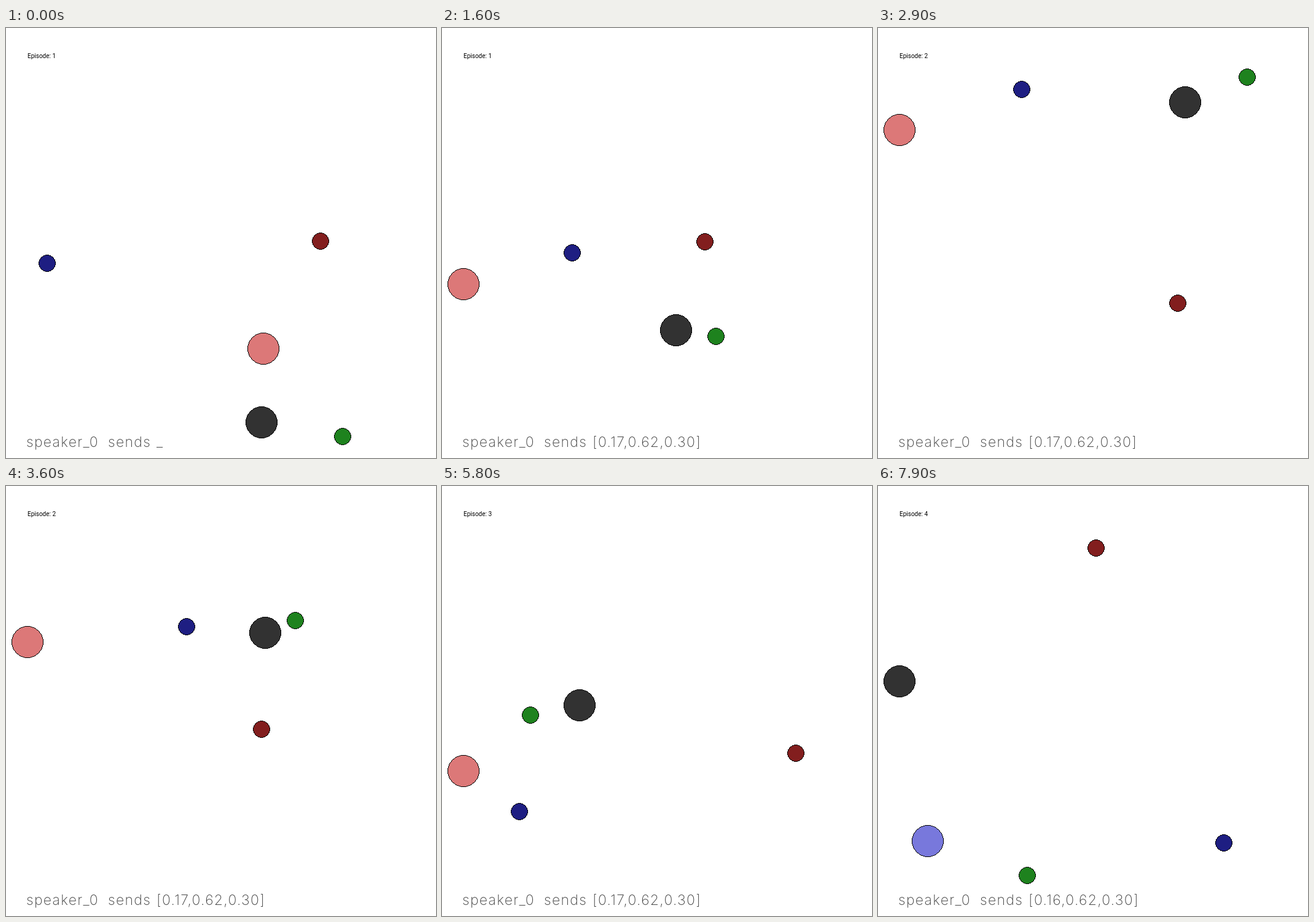
An HTML page with a canvas for the animation above (8000 ms loop, 700x700 px).

```html
<!DOCTYPE html>
<html lang="en">
<head>
<meta charset="utf-8">
<title>Speaker and listener</title>
<style>
  html, body { margin: 0; width: 100%; height: 100%; overflow: hidden; background: #fff; }
  canvas { display: block; }
</style>
</head>
<body>
<canvas id="stage" width="700" height="700"></canvas>
<script>
const ctx = document.getElementById('stage').getContext('2d');
const STEP = 100, STEPS = 80, EPISODE = 25, HALF = 350;
const MARK_COLORS = ['rgb(130,30,30)', 'rgb(30,130,30)', 'rgb(30,30,130)'];
const PINK = 'rgb(220,120,120)', LILAC = 'rgb(120,120,220)';

// World positions; pull is the listener's terminal speed per step.
const episodes = [
  { start: [77.8, 192.3], pull: [-66.33, -3.1], speaker: [74.08, 325.6],
    marks: [[180.5, -2.5], [221, 350], [-313.5, 37.5]], color: PINK, message: '[0.17,0.62,0.30]' },
  { start: [-315.2, -234.2], pull: [-74.18, -2.94], speaker: [195.8, -296.3],
    marks: [[180.7, 128.15], [327.2, -350], [-149, -323.2]], color: PINK, message: '[0.17,0.62,0.30]' },
  { start: [-141.1, 188.2], pull: [-78.15, -2.6], speaker: [-192.8, 11.6],
    marks: [[350, 132.3], [-315.6, 36.6], [-343.4, 279.5]], color: PINK, message: '[0.17,0.62,0.30]' },
  { start: [-206.4, 258.2], pull: [-72, -2.9], speaker: [-350, -34.5],
    marks: [[6.5, -275.5], [-117.5, 316.5], [237.5, 257.5]], color: LILAC, message: '[0.16,0.62,0.30]' }
];

// Distance covered after n steps of constant force with 25% damping.
const travel = n => n - 3 * (1 - 0.75 ** n);

// Rim points of one quadrant by the midpoint circle method.
function rim(r) {
  const points = [];
  for (let x = 0, y = r, f = 1 - r; x < y;) {
    if (f >= 0) f -= 2 * --y;
    f += 2 * ++x + 1;
    points.push([x, y], [y, x]);
  }
  return points;
}
const rims = { 14: rim(14), 26: rim(26) };

// Unsmoothed disc with a black outline one pixel wide.
function disc(cx, cy, r, color) {
  ctx.fillStyle = color;
  for (const [x, y] of rims[r])
    for (const row of [cy + y - 1, cy - y]) ctx.fillRect(cx - x, row, 2 * x, 1);
  ctx.fillStyle = '#000';
  for (const [x, y] of rims[r])
    for (const row of [cy + y - 1, cy - y])
      for (const col of [cx + x - 1, cx - x]) ctx.fillRect(col, row, 1, 1);
}

function entity(pos, zoom, r, color) {
  const [x, y] = pos.map(v => Math.floor(HALF + 0.9 * Math.floor(v * zoom + 1e-6) + 1e-6));
  disc(x, y, r, color);
}

function text(str, x, y, font, color, spacing = '0px') {
  ctx.font = font;
  ctx.letterSpacing = spacing;
  ctx.fillStyle = color;
  ctx.fillText(str, x, y);
}

const say = (str, x) => text(str, x, 682, '200 23px Inter, sans-serif', '#444', '1.3px');

function draw(step) {
  const index = Math.floor(step / EPISODE), local = step % EPISODE;
  const ep = episodes[index];
  const moved = travel(Math.max(0, local - 1));
  const listener = ep.start.map((v, i) => v + ep.pull[i] * moved);
  // The view widens to keep everything on stage.
  const reach = Math.max(...[listener, ep.speaker, ...ep.marks].flat().map(Math.abs));
  const zoom = HALF / reach;

  ctx.fillStyle = '#fff';
  ctx.fillRect(0, 0, 700, 700);
  entity(ep.speaker, zoom, 26, 'rgb(50,50,50)');
  entity(listener, zoom, 26, ep.color);
  ep.marks.forEach((pos, i) => entity(pos, zoom, 14, MARK_COLORS[i]));

  say('speaker_0', 33);
  say('sends', 166);
  say(local ? ep.message : '_', 245);
  text('Episode: ' + (index + 1), 35, 49, '10px Roboto, sans-serif', '#000');
}

function tick() {
  draw(Math.floor(performance.now() / STEP) % STEPS);
  requestAnimationFrame(tick);
}
tick();
</script>
</body>
</html>
```
